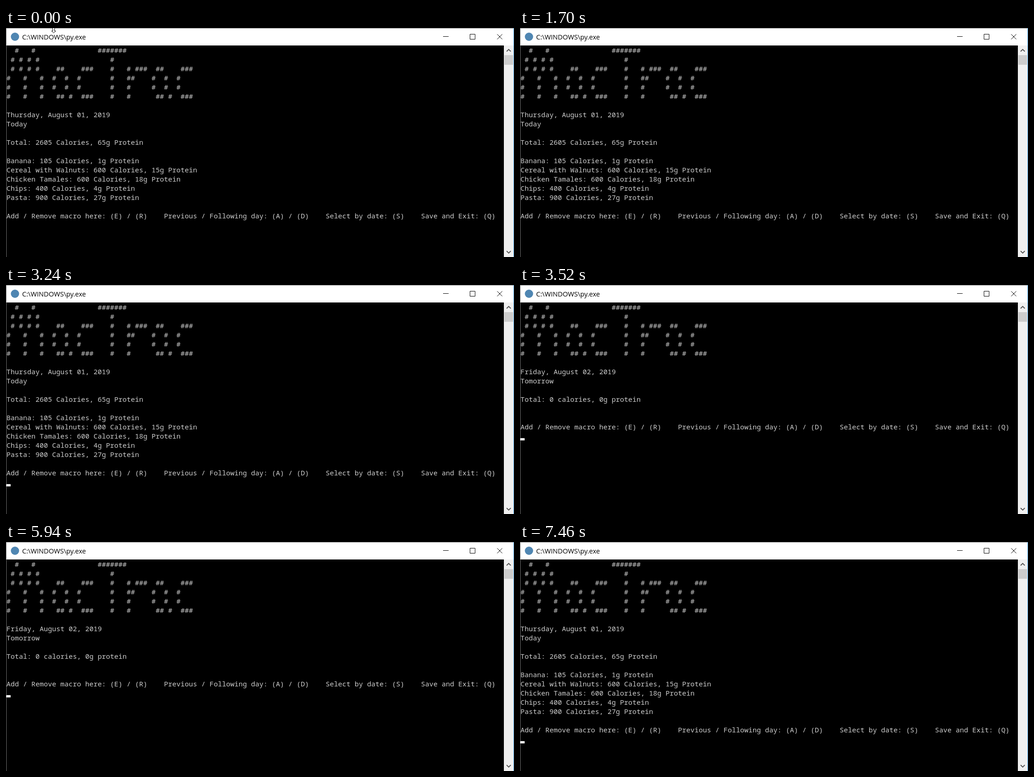
Animation of 1103x498 px, one loop 7990 ms. Source, as an HTML page:

```html
<!DOCTYPE html>
<html lang="en">
<head>
<meta charset="utf-8">
<title>Console</title>
<style>
  html, body { margin: 0; width: 100%; height: 100%; overflow: hidden; background: #000; }
  svg, pre, #caret { position: absolute; left: 0; top: 0; }
  pre { left: 1px; top: 38px; margin: 0; color: #ccc; font: 15px/20px "Noto Sans Mono", monospace; }
  #caret { left: 1px; width: 9px; height: 5px; background: #fff; }
</style>
</head>
<body>
<svg width="1103" height="498" fill="none">
  <path fill="#fff" d="M0 0H1103V38H0z"/>
  <circle cx="19.5" cy="19" r="9" fill="#4f86b2"/>
  <text x="35" y="25" fill="#000" font-family="Open Sans, sans-serif" font-size="14.6">C:\WINDOWS\py.exe</text>
  <path stroke="#000" d="M949 18.5h12M1007.5 13.5h11v11h-11zM1066.5 13.5l11 11m0-11l-11 11"/>
  <path fill="#f0f0f0" d="M1081 38h21v460h-21z"/>
  <path fill="#cdcdcd" d="M1082 59h19v21h-19z"/>
  <path stroke="#505050" stroke-width="1.8" d="M1087 51l4.5-4.5 4.5 4.5M1087 485l4.5 4.5 4.5-4.5"/>
  <path stroke="#777" d="M0 .5H1103M.5 0V498"/>
  <path stroke="#2b8fd6" d="M1102.5 0V498"/>
  <path id="pointer" fill="#fff" stroke="#000" d="M101.5 0V6.5H99l4.5 4.5 4.5-4.5h-2.5V0"/>
</svg>
<pre id="screen"></pre>
<div id="caret"></div>
<script>
const LOOP = 7990, POINTER_GONE = 150, NEXT_DAY = 3520, BACK = 6350;
const TOP = 38, LINE = 20, CARET_DROP = 15;
// The caret toggles at each of these times.
const BLINKS = [150, 710, 1140, 1700, 2260, 2690, 3240, 4370, 4950, 5360, 5940, 6930, 7460];

const banner = `  #   #               #######
 # # # #                 #
 # # # #    ##    ###    #   # ###  ##    ###
#   #   #  #  #  #       #   ##    #  #  #
#   #   #  #  #  #       #   #     #  #  #
#   #   #   ## #  ###    #   #      ## #  ###
`;
const menu = [
  "Add / Remove macro here: (E) / (R)",
  "Previous / Following day: (A) / (D)",
  "Select by date: (S)",
  "Save and Exit: (Q)"
].join("    ");

const page = body => `${banner}\n${body}\n${menu}`;
const today = page(`Thursday, August 01, 2019
Today

Total: 2605 Calories, 65g Protein

Banana: 105 Calories, 1g Protein
Cereal with Walnuts: 600 Calories, 15g Protein
Chicken Tamales: 600 Calories, 18g Protein
Chips: 400 Calories, 4g Protein
Pasta: 900 Calories, 27g Protein
`);
const tomorrow = page(`Friday, August 02, 2019
Tomorrow

Total: 0 calories, 0g protein

`);

const [screenEl, caret, pointer] = ["screen", "caret", "pointer"].map(id => document.getElementById(id));
const show = (el, on) => el.style.visibility = on ? "visible" : "hidden";

function draw(now) {
  const t = now % LOOP;
  const text = t >= NEXT_DAY && t < BACK ? tomorrow : today;
  if (screenEl.textContent !== text) screenEl.textContent = text;
  caret.style.top = TOP + LINE * text.split("\n").length + CARET_DROP + "px";
  show(caret, BLINKS.filter(b => b <= t).length % 2);
  show(pointer, t < POINTER_GONE);
}

function tick() {
  draw(performance.now());
  requestAnimationFrame(tick);
}
tick();
</script>
</body>
</html>
```
